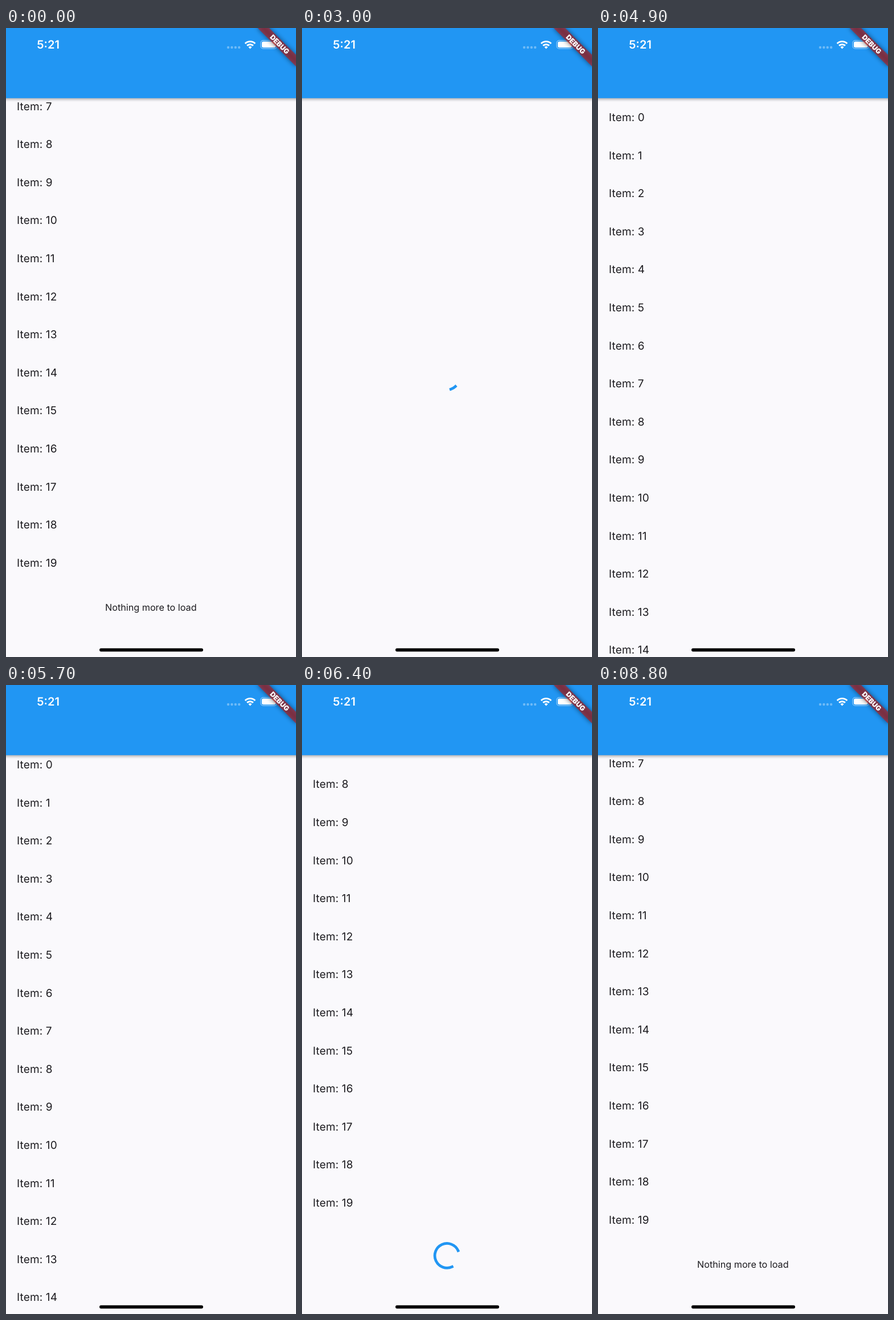
Recreate the animation shown at these times as an HTML page. Size 509 px wide and 1101 px high, loop 8.9 s.

```html
<!DOCTYPE html>
<html lang="en">
<head>
<meta charset="utf-8">
<title>Endless list</title>
<style>
  html, body { margin: 0; width: 100%; height: 100%; overflow: hidden; background: #faf9fc; }
  svg { display: block; width: 100%; height: 100%; }
  text { font-family: Inter, Roboto, sans-serif; text-rendering: geometricPrecision; }
  #items text { font-size: 19px; letter-spacing: .15px; fill: #1c1b1f; }
  #footer { font-size: 16.2px; fill: #1c1b1f; text-anchor: middle; }
  #spinner { fill: none; stroke: #2196f3; stroke-width: 4.76; stroke-linecap: square; }
</style>
</head>
<body>
<svg viewBox="0 0 509 1101">
  <defs>
    <filter id="barBlur" x="-10%" y="-30%" width="120%" height="160%"><feGaussianBlur stdDeviation="2.4"/></filter>
    <filter id="ribbonBlur" x="-30%" y="-150%" width="160%" height="400%"><feGaussianBlur stdDeviation="4.4"/></filter>
  </defs>
  <rect width="509" height="1101" fill="#faf9fc"/>

  <g id="list">
    <g id="items"></g>
    <text id="footer" x="254.3" y="1505.4">Nothing more to load</text>
  </g>
  <path id="spinner"/>

  <!-- app bar -->
  <rect x="-20" y="20" width="549" height="105" opacity=".32" filter="url(#barBlur)"/>
  <rect width="509" height="122.8" fill="#2196f3"/>

  <!-- status bar -->
  <g fill="#fff">
    <text x="54.3" y="36.2" font-size="20" font-weight="600">5:21</text>
    <g opacity=".35">
      <circle cx="390" cy="34" r="2.2"/><circle cx="396.4" cy="34" r="2.2"/>
      <circle cx="402.8" cy="34" r="2.2"/><circle cx="409.2" cy="34" r="2.2"/>
    </g>
    <g fill="none" stroke="#fff" stroke-width="2.9">
      <path d="M419.7 27.3A12.4 12.4 0 0 1 437.3 27.3"/>
      <path d="M423.1 30.9A7.8 7.8 0 0 1 433.9 30.9"/>
    </g>
    <path d="M425.5 33.4A4.3 4.3 0 0 1 431.5 33.4L428.5 36.5Z"/>
    <rect x="447" y="21.8" width="28.6" height="14.4" rx="4.4" fill="none" stroke="#fff" stroke-opacity=".5" stroke-width="1.2"/>
    <rect x="449" y="23.8" width="24.6" height="10.4" rx="2.6"/>
  </g>

  <!-- corner ribbon -->
  <g transform="translate(509 0) rotate(45)">
    <rect x="-47.6" y="33.3" width="95.2" height="14.3" fill-opacity=".5" filter="url(#ribbonBlur)"/>
    <rect x="-47.6" y="33.3" width="95.2" height="14.3" fill="#b71c1c" fill-opacity=".627"/>
    <text y="44.8" font-size="12.1" font-weight="900" fill="#fff" text-anchor="middle">DEBUG</text>
  </g>

  <rect x="164" y="1085.7" width="182" height="5.8" rx="2.9"/>
</svg>

<script>
const LOOP = 8900, STEP = 100;
const RELOAD = 1900, LOADED = 4900, FLING = 5700, EXHAUSTED = 8400;
const ROW = 66.6, ROWS = 20, FIRST_BASELINE = 163;
const MAX_WITH_SPINNER = 513, MAX_WITH_TEXT = 485.6;
const SPINNER_X = 254.5, SPINNER_R = 21.4;

const list = document.getElementById('list');
const footer = document.getElementById('footer');
const spinner = document.getElementById('spinner');

document.getElementById('items').innerHTML = Array.from({ length: ROWS }, (_, i) =>
  `<text x="19" y="${FIRST_BASELINE + i * ROW}">Item: ${i}</text>`).join('');

const clamp01 = x => Math.min(1, Math.max(0, x));

// cubic-bezier(.4, 0, .2, 1)
function fastOutSlowIn(x) {
  let lo = 0, hi = 1;
  for (let i = 0; i < 24; i++) {
    const s = (lo + hi) / 2, r = 1 - s;
    if (1.2 * r * r * s + 0.6 * r * s * s + s ** 3 < x) lo = s; else hi = s;
  }
  return 3 * (1 - lo) * lo * lo + lo ** 3;
}

// Overdamped spring with the given displacement and velocity (seconds)
function spring(x, v, t) {
  const slow = -9.08, fast = -22.03;
  const b = (v - slow * x) / (fast - slow);
  return (x - b) * Math.exp(slow * t) + b * Math.exp(fast * t);
}

function scrollAt(t) {
  if (t >= RELOAD && t < FLING) return 0;
  if (t >= EXHAUSTED) {
    const rest = spring(MAX_WITH_SPINNER - MAX_WITH_TEXT, 0, (t - EXHAUSTED) / 1000 + 0.05);
    return MAX_WITH_TEXT + (rest < 1 ? 0 : rest);
  }
  if (t < RELOAD) return MAX_WITH_TEXT;

  const s = (t - FLING) / 1000, speed = 2242, hit = 0.293;
  if (s < hit) return 17 + speed / 2 * (1 - Math.exp(-2 * s));
  return MAX_WITH_SPINNER + spring(0, speed * Math.exp(-2 * hit), s - hit);
}

function drawSpinner(age, cy) {
  const cycle = age / 1333 % 1, turn = age / 2222 % 1;
  const head = fastOutSlowIn(clamp01(cycle * 2));
  const tail = fastOutSlowIn(clamp01(cycle * 2 - 1));
  const start = Math.PI * (-0.5 + tail * 1.5 + turn * 2 + cycle * 0.5);
  const sweep = Math.max((head - tail) * 1.5 * Math.PI, 0.001);
  const point = a =>
    `${(SPINNER_X + SPINNER_R * Math.cos(a)).toFixed(4)} ${(cy + SPINNER_R * Math.sin(a)).toFixed(4)}`;
  spinner.setAttribute('d',
    `M${point(start)}A${SPINNER_R} ${SPINNER_R} 0 ${+(sweep > Math.PI)} 1 ${point(start + sweep)}`);
}

function render(t) {
  const loading = t >= RELOAD && t < LOADED;
  const exhausted = t < RELOAD || t >= EXHAUSTED;
  const scroll = scrollAt(t);

  list.style.display = loading ? 'none' : '';
  list.setAttribute('transform', `translate(0 ${-scroll})`);
  footer.style.display = exhausted ? '' : 'none';
  spinner.style.display = exhausted ? 'none' : '';

  if (loading) drawSpinner(17 + (Math.min(t, 4700) - RELOAD) * 0.981, 611.9);
  else if (!exhausted) drawSpinner(Math.max(0, t - 5723), 1514.3 - scroll);
}

const origin = performance.now();
function tick() {
  const t = (performance.now() - origin) % LOOP;
  render(Math.floor(t / STEP) * STEP);
  requestAnimationFrame(tick);
}
tick();
</script>
</body>
</html>
```
